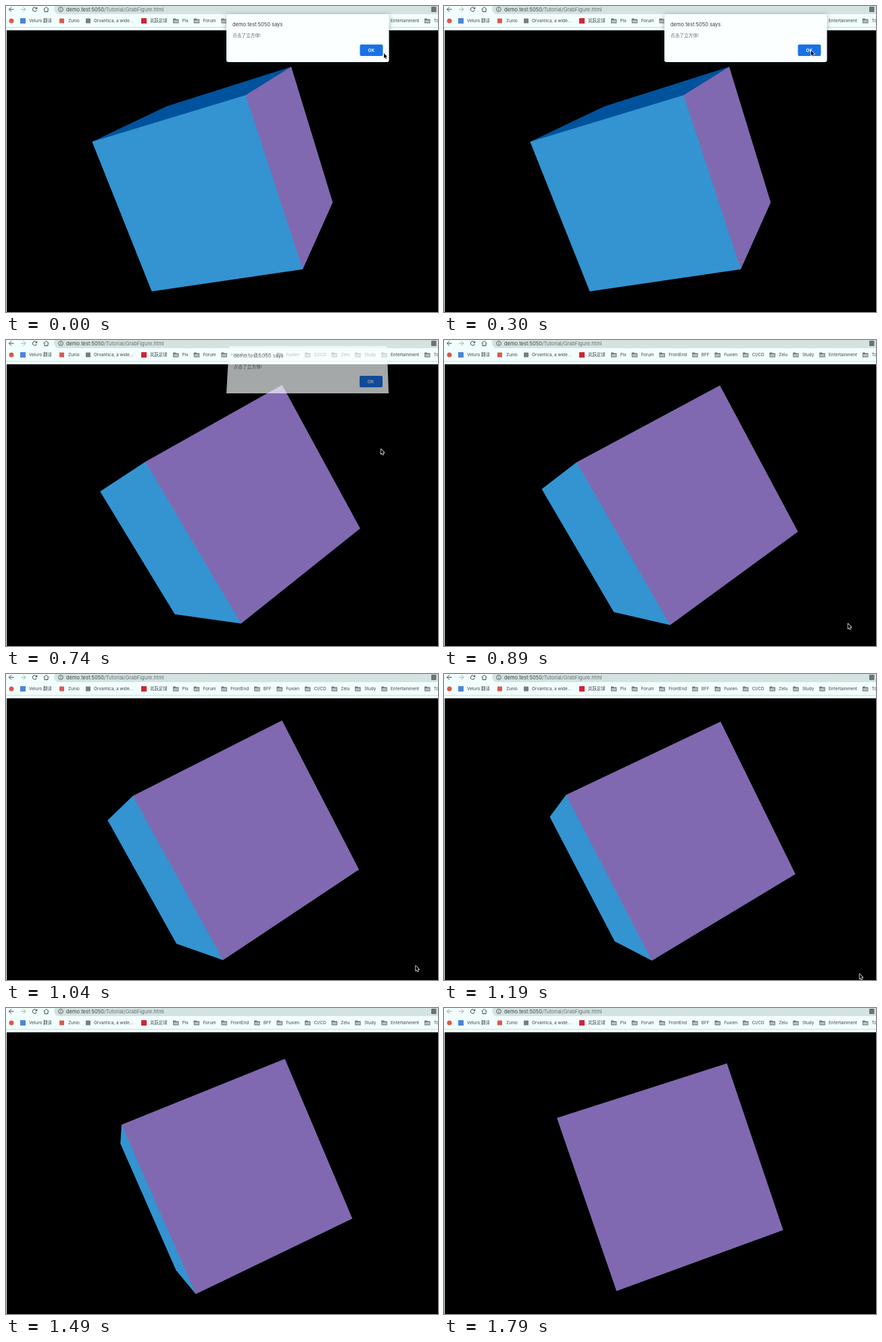
Write an HTML page with a canvas that moves like this. It is 639 by 453 pixels and loops after 1.89 s.

```html
<!DOCTYPE html>
<html lang="zh">
<head>
<meta charset="utf-8">
<title>Cube picking</title>
<style>
  html, body { margin: 0; width: 100%; height: 100%; overflow: hidden; background: #000; }
  canvas { display: block; }
</style>
</head>
<body>
<canvas id="stage" width="639" height="453"></canvas>
<script>
const W = 639, H = 453, LOOP = 1890;
const stage = document.getElementById('stage');
const layer = document.createElement('canvas');
layer.width = W;
layer.height = H;
const page = stage.getContext('2d'), popup = layer.getContext('2d');
let ctx = page;

const FONT = 'Inter, "Noto Sans CJK SC", "Noto Sans CJK", sans-serif';
const BAR = '#f2fefd', INK = '#3b4544', ICON = '#3f4948';
const HOST = 'demo.test:5050';
const FOLDERS = ['Pix', 'Forum', 'FrontEnd', 'BFF', 'Fuxien', 'CI/CD', 'Zelu', 'Study', 'Entertainment', 'Tools'];

// The picture advances every 150 ms; the fourth step is 10 ms short.
const stepTime = i => i * 150 - (i > 3 ? 10 : 0);
const PRESS = stepTime(4), CLOSE = stepTime(5), OPEN_PAGE = stepTime(6), LAST = stepTime(12);

// Cursor waypoints: time, x, y.
const PATH = [[0, 559, 70], [150, 543, 66], [PRESS, 543, 66], [CLOSE, 554.5, 161.5],
              [OPEN_PAGE, 597.5, 420], [1190, 614.5, 444]];

function trace(points) {
  ctx.beginPath();
  points.forEach(p => ctx.lineTo(p[0], p[1]));
}

function poly(points, color) {
  trace(points);
  ctx.fillStyle = color;
  ctx.fill();
}

function line(points, color) {
  trace(points);
  ctx.strokeStyle = color;
  ctx.lineWidth = 1;
  ctx.stroke();
}

function box(x, y, w, h, r, color) {
  ctx.beginPath();
  ctx.roundRect(x, y, w, h, r);
  ctx.fillStyle = color;
  ctx.fill();
}

function ring(x, y, r, from, to, color) {
  ctx.beginPath();
  ctx.arc(x, y, r, from, to);
  ctx.strokeStyle = color;
  ctx.lineWidth = 1;
  ctx.stroke();
}

// Draws text and returns its width.
function text(str, x, y, size, color, weight = 400) {
  ctx.font = `${weight} ${size}px ${FONT}`;
  ctx.fillStyle = color;
  ctx.fillText(str, x, y);
  return ctx.measureText(str).width;
}

function arrow(x, dir, color) {
  line([[x - 3.5 * dir, 5], [x + 3.5 * dir, 5]], color);
  line([[x, 1.5], [x + 3.5 * dir, 5], [x, 8.5]], color);
}

function folder(x) {
  box(x, 18.5, 4, 3, 0.5, '#707978');
  box(x, 19.4, 8.5, 6, 0.5, '#707978');
  box(x + 0.9, 21, 6.7, 3.4, 0, '#b9c2c1');
}

function addressBar(t) {
  arrow(8, -1, t < LAST ? ICON : '#99a3a2');
  arrow(25.5, 1, '#a3adac');
  ring(42.5, 5, 3.1, 0.3, 5.4, ICON);
  poly([[46.2, 1.2], [46.2, 4.6], [42.8, 4.6]], ICON);
  line([[55.5, 5], [59.5, 1.6], [63.5, 5]], ICON);
  line([[57, 4.5], [57, 8.5], [62, 8.5], [62, 4.5]], ICON);

  box(71, -3, 590, 15, 7.5, '#d4e2e1');
  ring(81, 5, 3.4, 0, Math.PI * 2, '#5d6867');
  box(80.5, 4.5, 1, 2.5, 0, '#5d6867');
  box(80.5, 2.8, 1, 1, 0, '#5d6867');
  const w = text(HOST, 89, 7.7, 7.5, INK);
  text('/Tutorial/GrabFigure.html', 89 + w, 7.7, 7.5, '#667170');
  box(629, 1, 7.5, 8, 1, '#697473');
}

function bookmark(iconX, size, color, name, x) {
  box(iconX, 22 - size / 2, size, size, 0.5, color);
  text(name, x, 24.3, 6.4, INK);
}

function bookmarks() {
  box(4.5, 18.5, 7, 7, 3.5, '#e25548');
  bookmark(21, 8, '#4c85d8', 'Veluro 翻译', 34);
  bookmark(79, 7, '#d95a50', 'Zunio', 92);
  bookmark(118, 7, '#777f7e', 'Orvantica, a wide...', 130);
  bookmark(200, 8, '#cf2632', '岚跃足球', 213);
  let x = 247;
  for (const name of FOLDERS) {
    folder(x);
    x += 13.7 + text(name, x + 13.7, 24.3, 6.4, INK) + 7.9;
  }
}

function browser(t) {
  box(0, 0, W, 36, 0, BAR);
  box(0, 36, 1, H - 36, 0, BAR);
  box(0, 31, W, 1, 0, '#cfdddf');
  addressBar(t);
  bookmarks();
}

// Columns of Rx(a) * Ry(a) * Rz(a).
function axes(deg) {
  const a = deg * Math.PI / 180, s = Math.sin(a), c = Math.cos(a);
  return [
    [c * c, c * s + s * s * c, s * s - s * c * c],
    [-s * c, c * c - s ** 3, s * c + c * s * s],
    [s, -s * c, c * c]
  ];
}

// Perspective view from distance 7 of a cube with half-edge 1.
function cube(t) {
  const deg = t < CLOSE ? 200 : 228.6 + 0.0203 * (t - CLOSE);
  const [right, up, front] = axes(deg);
  const project = (n, u, v, i, j) => {
    const [x, y, z] = n.map((k, d) => k + i * u[d] + j * v[d]);
    const scale = 798 / (7 - z);
    return [322.5 + x * scale, 250.3 - y * scale];
  };
  const face = (n, u, v, color) => {
    if (n[2] * 7 <= 1) return;
    poly([[-1, -1], [1, -1], [1, 1], [-1, 1]].map(([i, j]) => project(n, u, v, i, j)), color);
  };
  // Additive blending keeps shared edges free of dark seams.
  ctx.globalCompositeOperation = 'lighter';
  face(front, right, up, '#3394d1');
  face(right, up, front, '#8069b0');
  face(up, front, right, '#00529c');
  ctx.globalCompositeOperation = 'source-over';
}

function dialog(t) {
  if (t >= OPEN_PAGE) return;
  const closing = t >= CLOSE;
  const dy = closing ? -4 : 0, dx = closing ? 1.5 : 0;
  ctx = popup;
  ctx.clearRect(0, 0, W, H);
  if (closing) {
    poly([[330, 9], [563.5, 9], [566, 79], [326, 79]], '#fbffff');
  } else {
    ctx.save();
    ctx.shadowColor = 'rgba(40,60,60,.4)';
    ctx.shadowBlur = 7;
    ctx.shadowOffsetY = 1;
    box(326, 12, 240.5, 71, 3, '#fbffff');
    ctx.restore();
  }
  text(HOST + ' says', 335 + dx, 30 + dy, 7.5, '#343b3b');
  text('点击了立方体!', 335 + dx, 45.5 + dy, 6.7, '#656c6c');
  box(523.5 - dx / 3, 57 + dy, 34, 17, 2, t === PRESS ? '#457fd6' : '#1a72e6');
  ctx.textAlign = 'center';
  text('OK', 540.3 - dx / 2, 67.8 + dy, 6.4, '#fff', 600);
  ctx.textAlign = 'left';

  ctx = page;
  ctx.globalAlpha = closing ? 0.66 : 1;
  ctx.drawImage(layer, 0, 0);
  ctx.globalAlpha = 1;
}

function cursor(t) {
  const next = PATH.findIndex(p => p[0] >= t);
  if (next < 0) return;
  const b = PATH[next], a = PATH[Math.max(0, next - 1)];
  const k = b === a ? 0 : (t - a[0]) / (b[0] - a[0]);
  ctx.save();
  ctx.translate(a[1] + (b[1] - a[1]) * k, a[2] + (b[2] - a[2]) * k);
  ctx.scale(0.88, 0.88);
  trace([[0, 0], [0, 8.3], [1.9, 6.6], [3.2, 9.6], [4.5, 9], [3.2, 6.1], [5.8, 6]]);
  ctx.closePath();
  ctx.lineWidth = 1.6;
  ctx.lineJoin = 'round';
  ctx.strokeStyle = '#fff';
  ctx.stroke();
  ctx.fillStyle = '#000';
  ctx.fill();
  ctx.restore();
}

function draw(time) {
  const now = time % LOOP;
  let step = 12;
  while (stepTime(step) > now) step--;
  const t = stepTime(step);
  box(0, 0, W, H, 0, '#000');
  cube(t);
  browser(t);
  dialog(t);
  cursor(t);
}

let start;
function tick(now) {
  start ??= now;
  draw(Math.max(0, now - start));
  requestAnimationFrame(tick);
}
draw(0);
requestAnimationFrame(tick);
</script>
</body>
</html>
```
